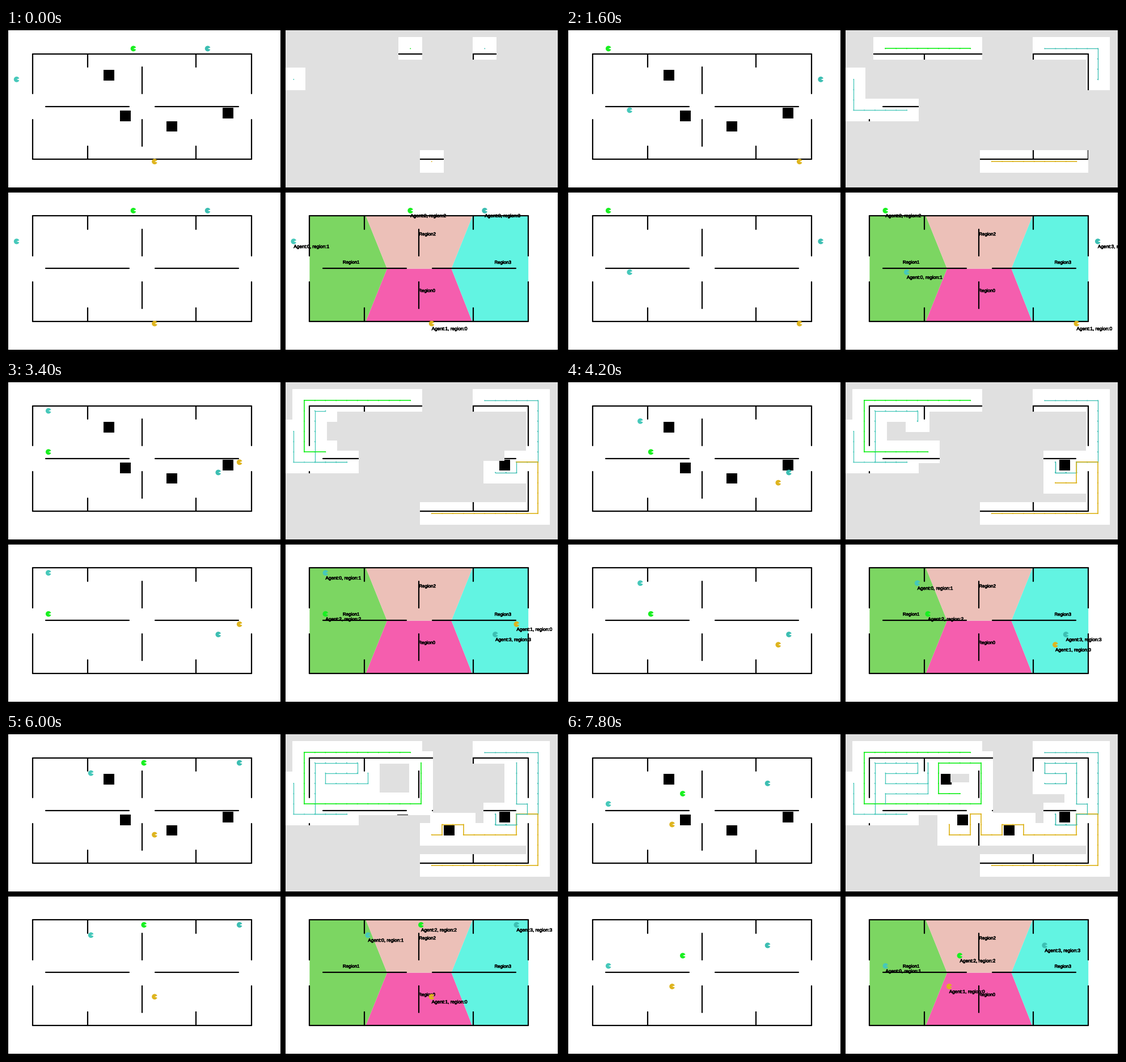
Write a matplotlib script that moves like this. It is 977x573 px and loops after 8 s.

```python
import numpy as np
import matplotlib.pyplot as plt
from matplotlib.animation import FuncAnimation
from matplotlib.collections import LineCollection
from matplotlib.patches import Polygon, Rectangle, Wedge
from matplotlib.patheffects import withStroke

W, H, DPI = 977, 573, 100
PX = 72 / DPI                      # points per pixel
DX, DY = 488.6, 286.5              # offset between panels
FRAMES, STEP_MS = 40, 200
STEPS = {"U": (0, -1), "D": (0, 1), "L": (-1, 0), "R": (1, 0), "W": (0, 0)}

# start cell, runs of moves (W waits), colour, trail width, region
AGENTS = [
    ((0, 3), "D3 R5 L3 U5 R4 D1 L3 D1 R4 U2 D3 L4 D1", "#46c8ba", 1.3, 1),
    ((13, 11), "R10 U5 L2 D2 L5 W1 U1 L2 D1 L2 U2 L1 D2 L2 U1", "#deb41e", 1.7, 0),
    ((11, 0), "L10 D5 R11 U4 L4 D3 R2", "#18f020", 1.7, 2),
    ((18, 0), "R5 D6 L2 W1 D1 L2 U1 W1 D1 R2 U1 R1 U1 L1 U4 L3 D1 R2 D1 L2",
     "#3cbeb2", 1.3, 3),
]

X0, X1, Y0, Y1 = 46.8, 432.6, 45.5, 232.3
WALLS = [
    (X0, Y0, X1, Y0), (X0, Y1, X1, Y1),
    (70, 138.8, 217, 138.8), (263, 138.8, 410, 138.8),
    (239.6, 69, 239.6, 116), (239.6, 162, 239.6, 209),
]
for wall_x in (X0, X1):
    WALLS += [(wall_x, Y0, wall_x, 116), (wall_x, 162, wall_x, Y1)]
for wall_x in (143.7, 335.4):
    WALLS += [(wall_x, Y0, wall_x, 69), (wall_x, 208.5, wall_x, Y1)]

BLOCKS = [(172, 74), (201, 146), (283, 164.5), (381.5, 141)]


def walk(start, runs):
    """Pixel position of the agent at every step."""
    cells = [np.array(start)]
    for run in runs.split():
        for _ in range(int(run[1:])):
            cells.append(cells[-1] + STEPS[run[0]])
    return np.array(cells) * (18.72, 18.16) + (18.7, 36.4)


paths = [walk(a[0], a[1]) for a in AGENTS]

fig = plt.figure(figsize=(W / DPI, H / DPI), dpi=DPI, facecolor="black")
ax = fig.add_axes([0, 0, 1, 1])
ax.set_xlim(0, W)
ax.set_ylim(H, 0)
ax.axis("off")


def panel(x, y):
    box = Rectangle((x, y), 480, 278, fc="white", lw=0, zorder=0)
    return ax.add_patch(box)


def draw_walls(dx, dy):
    lines = [[(a + dx, b + dy), (c + dx, d + dy)] for a, b, c, d in WALLS]
    ax.add_collection(LineCollection(lines, colors="black", linewidths=2.2 * PX,
                                     capstyle="round", zorder=2))


def draw_blocks(dx):
    for x, y in BLOCKS:
        ax.add_patch(Rectangle((x + dx, y), 19, 18.6, fc="black", lw=0, zorder=2))


def label(x, y, text, size, z):
    t = ax.text(x, y, text, family="Liberation Sans", size=size * PX,
                color="black", va="baseline", zorder=z,
                path_effects=[withStroke(linewidth=0.6 * PX, foreground="black")])
    t.set_clip_path(region_panel)
    return t


panel(4, 4)
panel(493, 4)
panel(4, 291)
region_panel = panel(493, 291)
for ox in (0, DX):
    for oy in (0, DY):
        draw_walls(ox, oy)
    draw_blocks(ox)

# Region partition
L, R, T, B = X0 + DX, X1 + DX, Y0 + DY, Y1 + DY
MID_L, MID_R = (672, 425.6), (785.5, 425.6)
REGIONS = [
    ([MID_L, MID_R, (822, B), (634.5, B)], "#f55eae", (727.5, 467)),
    ([(L, T), (634.5, T), MID_L, (634.5, B), (L, B)], "#7cd662", (594, 416.7)),
    ([(634.5, T), (823, T), MID_R, MID_L], "#ecc0b8", (728.5, 367)),
    ([(823, T), (R, T), (R, B), (822, B), MID_R], "#62f4e2", (861.5, 417)),
]
for i, (pts, color, pos) in enumerate(REGIONS):
    ax.add_patch(Polygon(pts, fc=color, lw=0, zorder=1))
    label(*pos, f"Region{i}", 7.9, 3)

# Unexplored area and trails
fog = np.zeros((278, 480, 4))
fog[..., :3] = 224 / 255
fog_img = ax.imshow(fog, extent=(493, 973, 282, 4), interpolation="nearest",
                    aspect="auto", zorder=4)
ax.set_xlim(0, W)
ax.set_ylim(H, 0)
trails = LineCollection([], capstyle="projecting", zorder=5)
ax.add_collection(trails)
dots = ax.scatter([], [], s=(1.9 * PX) ** 2, linewidths=0, zorder=6)

# Agents appear in every panel but the explored map
bodies, tags = [], []
for i, (_, _, color, _, region) in enumerate(AGENTS):
    group = []
    for offset in ((0, 0), (0, DY), (DX, DY)):
        body = Wedge((0, 0), 4.9, 20, 340, fc=color, lw=0, zorder=7)
        group.append((ax.add_patch(body), np.array(offset)))
    bodies.append(group)
    tags.append(label(0, 0, f"Agent:{i}, region:{region}", 8.25, 8))


def update(n):
    fog[..., 3] = 1
    segs, colors, widths, spots, spot_colors = [], [], [], [], []
    for k in range(n + 1):
        for path, (_, _, color, width, _) in zip(paths, AGENTS):
            x, y = path[k] + (DX, 0)
            left, right = round(x - 21) - 493, round(x + 21) - 493
            top, bottom = round(y - 20.4) - 4, round(y + 19.6) - 4
            fog[max(top, 0):bottom, max(left, 0):right, 3] = 0
            spots.append((x, y))
            spot_colors.append(color)
            if k and np.any(path[k] != path[k - 1]):
                segs.append([path[k - 1] + (DX, 0), (x, y)])
                colors.append(color)
                widths.append(width * PX)
    fog_img.set_data(fog)
    trails.set_segments(segs)
    trails.set_color(colors)
    trails.set_linewidth(widths or [1])
    dots.set_offsets(spots)
    dots.set_facecolor(spot_colors)
    for path, group, tag in zip(paths, bodies, tags):
        for body, offset in group:
            body.set_center(tuple(path[n] + offset))
        tag.set_position(path[n] + (DX, DY + 11.8))
    return []


anim = FuncAnimation(fig, update, frames=FRAMES, interval=STEP_MS,
                     init_func=lambda: update(0), repeat=True, repeat_delay=0,
                     blit=False)
plt.show()
```
